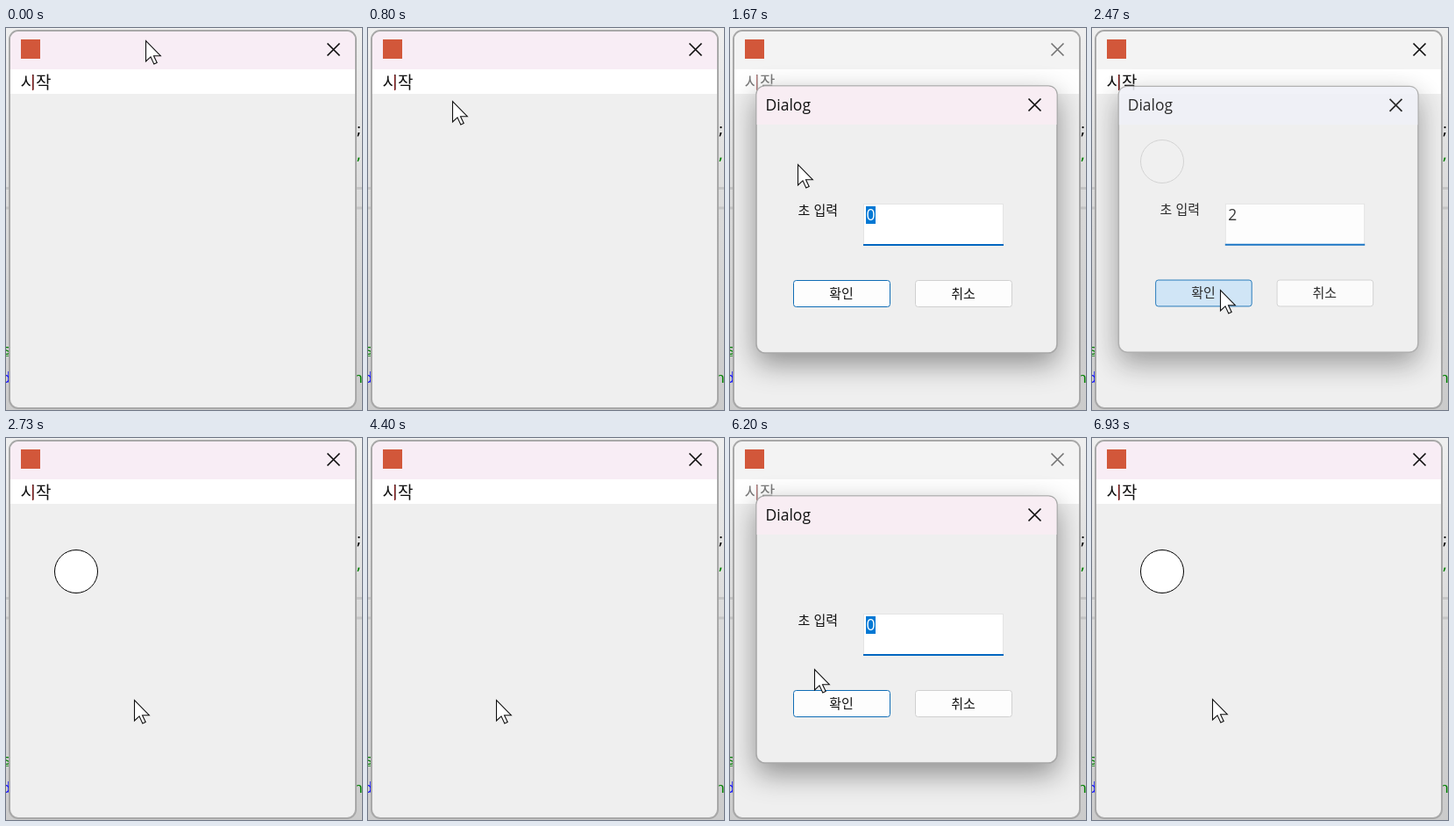
These frames come from a looping animation (406x435 px, 8 s). An HTML page:

```html
<!DOCTYPE html>
<html lang="ko">
<head>
<meta charset="utf-8">
<style>
  html, body { margin: 0; width: 100%; height: 100%; overflow: hidden; }
  svg { display: block; width: 406px; height: 435px; }
  text { font-family: "Noto Sans CJK KR", "Noto Sans CJK", sans-serif; white-space: pre; }
  .big { font-size: 19px; fill: #111; }
  .small { font-size: 15px; fill: #111; }
  .latin { font-family: "Open Sans", "Noto Sans", sans-serif; font-size: 17.5px; fill: #111; }
  .code { font-family: "Noto Sans Mono", "DejaVu Sans Mono", monospace; font-size: 17px; }
  .cross { fill: none; stroke: #111; stroke-width: 1.7; }
  #dialog { transform-origin: 105px 172.5px; }
  #frame { filter: drop-shadow(0 12px 16px rgba(0,0,0,.4)); }
</style>
</head>
<body>
<svg viewBox="0 0 406 435">
  <defs>
    <linearGradient id="desk" x2="0" y2="1">
      <stop offset="0" stop-color="#efefef"/>
      <stop offset=".45" stop-color="#dcdcdc"/>
      <stop offset="1" stop-color="#cbcbcb"/>
    </linearGradient>
    <clipPath id="mainClip"><rect x="5" y="4" width="393" height="428" rx="9"/></clipPath>
    <clipPath id="dialogClip"><rect x="30.5" y="66.5" width="342" height="303" rx="9"/></clipPath>
  </defs>

  <rect width="406" height="435" fill="url(#desk)"/>
  <path d="M0 182.5H406M0 205H406" stroke="#c6c6c6" stroke-width="3"/>
  <text class="code" x="397" y="121">;</text>
  <text class="code" x="397" y="150" fill="#008000">,</text>
  <text class="code" x="-4" y="372" fill="#008000">s</text>
  <path d="M0 373.5H5" stroke="#3a9a3a"/>
  <text class="code" x="-5" y="404" fill="#0000ff">d</text>
  <text class="code" x="396.5" y="404" fill="#008000">n</text>

  <rect x="4" y="3" width="395" height="430" rx="10" fill="#efefef" stroke="#a8a8a8" stroke-width="2"/>
  <g clip-path="url(#mainClip)">
    <rect id="title" x="5" y="4" width="393" height="43"/>
    <rect x="5" y="47" width="393" height="28" fill="#fff"/>
  </g>
  <rect x="17" y="13" width="22" height="22" fill="#d2573a"/>
  <g id="mainInk">
    <path class="cross" d="M366.5 17.5l14 14m0-14l-14 14"/>
    <text class="big" x="16.5" y="69">시작</text>
    <path d="M30.6 53.5V71" stroke="#8a1c1c" stroke-width="1.2"/>
  </g>
  <circle id="circle" cx="80" cy="152" r="24.5" fill="#fff" stroke="#000"/>

  <g id="dialog">
    <rect id="frame" x="30" y="66" width="343" height="304" rx="10" fill="#efefef" stroke="#a8a8a8" stroke-width="1.6"/>
    <rect id="dialogTitle" x="30" y="66" width="343" height="44" clip-path="url(#dialogClip)"/>
    <text class="latin" x="40.5" y="94">Dialog</text>
    <path class="cross" d="M340.5 80.5l14 14m0-14l-14 14"/>
    <g id="controls">
      <text class="small" x="77.5" y="212.5">초 입력</text>
      <rect x="152.5" y="200.5" width="159" height="47" fill="#fff" stroke="#e4e4e4"/>
      <path id="underline" d="M152 247H312"/>
      <rect id="selection" x="155" y="203" width="11" height="20" fill="#0078d4"/>
      <text id="value" class="latin" x="155.5" y="219"></text>
      <rect id="ok" x="72.5" y="287.5" width="110" height="30" rx="3" stroke="#0f6cb5"/>
      <text class="small" x="127" y="307.5" text-anchor="middle">확인</text>
      <rect x="211.5" y="287.5" width="110" height="30" rx="3" fill="#fdfdfd" stroke="#d0d0d0"/>
      <text class="small" x="266" y="307.5" text-anchor="middle">취소</text>
    </g>
  </g>

  <g id="menu">
    <rect id="menuBox" x="8" y="78" width="198" height="36" fill="#fbfbfb"/>
    <rect id="menuItem" x="13" y="78" width="188" height="36" fill="#efefef"/>
    <text id="menuText" class="big" x="62" y="104">원그리기</text>
  </g>

  <path id="cursor" d="M.5 .5V24L6 18.8L9.8 27L13.2 25.5L9.5 17.7H17.3Z" fill="#fff" stroke="#111" stroke-width="1.1"/>
</svg>

<script>
const FPS = 15, LOOP = 8000;
const el = id => document.getElementById(id);
const clamp = v => Math.max(0, Math.min(1, v));
const mix = (a, b, k) => a + (b - a) * k;
const show = (id, on) => el(id).style.display = on ? "" : "none";
const set = (id, name, v) => el(id).setAttribute(name, v);
const blend = (a, b, k) => `rgb(${a.map((v, i) => Math.round(mix(v, b[i], k)))})`;

const PINK = [248, 237, 245], GREY = [243, 243, 243];

// Times in ticks of 1/15 s
const rounds = [
  { menu: 18, open: 20, controls: 21, type: 28, digit: "2", close: 37, erase: 66 },
  { menu: 79, open: 83, controls: 83, type: 95, digit: "3", close: 100, erase: 120 }
];

// Cursor stops: tick, x, y
const path = [
  [4, 159, 14], [8, 220, 60], [11, 120, 89], [14, 26, 64], [17, 22, 60], [20, 60, 99],
  [24, 75, 150], [33, 146, 298], [70, 146, 298], [78, 24, 62], [80, 26, 64], [83, 59, 104],
  [85, 62, 120], [92, 96, 263], [94, 96, 263], [98, 137, 297]
];

function cursorAt(f) {
  const i = path.findIndex(p => p[0] > f);
  if (i < 0) return path[path.length - 1].slice(1);
  if (!i) return path[0].slice(1);
  const [a, b] = [path[i - 1], path[i]];
  const u = (f - a[0]) / (b[0] - a[0]), k = u * u * (3 - 2 * u);
  return [mix(a[1], b[1], k), mix(a[2], b[2], k)];
}

function drawDialog(f, r, x, y) {
  const closing = f >= r.close;
  const out = (f - r.close + .35) / 3;
  const rest = (1 - clamp((f - r.open) / 3)) ** 2;
  const scale = closing ? 1 - .1 * out ** 1.5 : 1 - .12 * rest;
  const visible = f >= r.open && out < 1;
  show("dialog", visible);
  if (!visible) return;

  el("dialog").style.opacity = closing ? 1 - out : 1 - .7 * rest;
  el("dialog").style.transform = `scale(${scale})`;
  set("dialogTitle", "fill", closing ? "#f0f1f8" : "#f8edf3");
  show("controls", f >= r.controls);

  const typed = f >= r.type, focused = f > r.open;
  el("value").textContent = typed ? r.digit : "0";
  el("value").style.fill = focused && !typed ? "#fff" : "#222";
  show("selection", focused && !typed);
  set("underline", "stroke", focused ? "#0067c0" : "#999");
  set("underline", "stroke-width", focused ? 2 : 1);
  const hover = x > 72 && x < 183 && y > 287 && y < 318;
  set("ok", "fill", closing ? "#cce4f7" : hover ? "#e0eef9" : "#fdfdfd");
}

function draw(f) {
  const r = rounds[f < 70 ? 0 : 1];
  const [x, y] = cursorAt(f);
  set("cursor", "transform", `translate(${Math.round(x)} ${Math.round(y)})`);

  const inactive = clamp((f - r.open) / 3) * clamp((r.close + 4 - f) / 3);
  set("title", "fill", blend(PINK, GREY, inactive));
  el("mainInk").style.opacity = f >= r.open && f < r.close ? .55 : 1;
  show("circle", f >= r.close && f < r.erase);

  drawDialog(f, r, x, y);

  const fade = f < r.open ? 1 : .7 - .4 * (f - r.open);
  show("menu", f >= r.menu && f < r.open + 2);
  el("menuBox").style.opacity = el("menuItem").style.opacity = fade;
  el("menuText").style.opacity = f > r.open ? .3 : 1;
}

function tick() {
  const t = performance.now() % LOOP;
  draw(Math.floor((t + 4) * FPS / 1000) % 120);
  requestAnimationFrame(tick);
}
tick();
</script>
</body>
</html>
```
